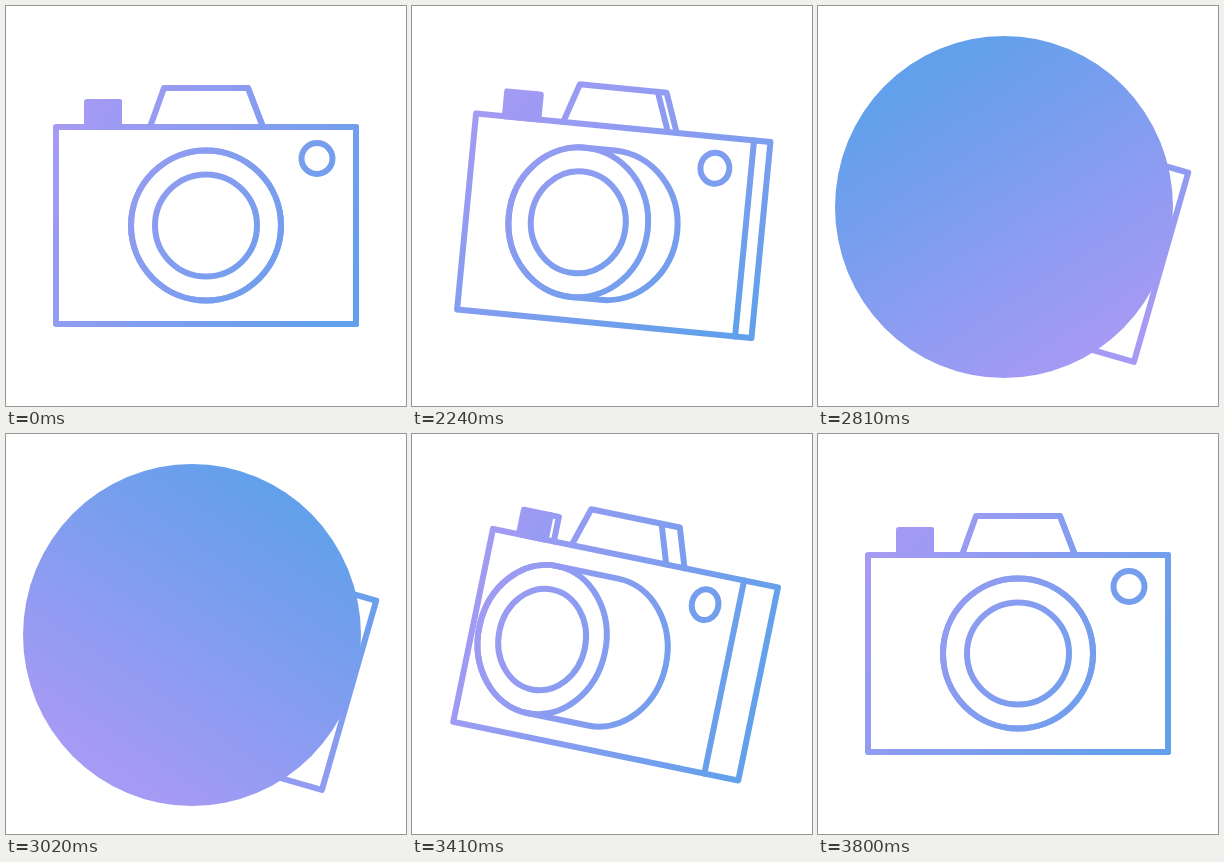
An HTML page with a canvas that plays this animation: 400 by 400 pixels, repeating every 3.83 s.

```html
<!DOCTYPE html>
<html>
<head>
<meta charset="utf-8">
<title>Camera</title>
<style>
html, body { margin: 0; width: 100%; height: 100%; overflow: hidden; background: #fff; }
canvas { display: block; width: 400px; height: 400px; }
</style>
</head>
<body>
<canvas width="400" height="400"></canvas>
<script>
const ctx = document.querySelector('canvas').getContext('2d');
const LOOP = 3830, START = 2000, STEP = 30;
const PURPLE = '#a59af4', BLUE = '#62a0eb';
const ROLL = 16 * Math.PI / 180;

const clamp = v => Math.max(0, Math.min(1, v));
const sine = u => 0.5 - 0.5 * Math.cos(Math.PI * clamp(u));
const smoother = u => u * u * u * (u * (6 * u - 15) + 10);

// Sets the shared colour sweep, centred on the stage
function paint(angle) {
  const x = 160 * Math.cos(angle), y = 160 * Math.sin(angle);
  const g = ctx.createLinearGradient(-x, -y, x, y);
  g.addColorStop(0, PURPLE);
  g.addColorStop(1, BLUE);
  ctx.fillStyle = ctx.strokeStyle = g;
}

function line(points, closed) {
  ctx.beginPath();
  points.forEach(p => ctx.lineTo(...p));
  if (closed) ctx.closePath();
  ctx.stroke();
}

function oval(x, y, rx, ry) {
  ctx.beginPath();
  ctx.ellipse(x, y, rx, ry, 0, 0, 2 * Math.PI);
}

// turn: 0 faces the viewer, 1 is fully turned to the side
function camera(turn) {
  const squash = 1 - 0.2 * turn;
  const at = (x, shift = 0) => x * squash + (shift - 13.2) * turn;

  // Body
  const top = -79, bottom = 118;
  const left = at(-150), edge = at(150), right = at(150, 47.6);
  line([[left, top], [right, top], [right, bottom], [left, bottom]], true);
  line([[edge, top], [edge, bottom]]);

  // Flash housing
  line([[at(-56), top], [at(-42), -118], [at(42, 25.7), -118], [at(57, 25.7), top]]);
  line([[at(42), -118], [at(57), top]]);

  // Shutter button
  const b0 = at(-119), b1 = at(-87), b2 = at(-87, 11.4);
  line([[b0, top], [b0, -104], [b1, -104], [b1, top]], true);
  ctx.fill();
  line([[b1, -104], [b2, -104], [b2, top]]);

  // Viewfinder
  oval(at(111), -47.5, 15.5 * squash, 15.5);
  ctx.stroke();

  // Lens barrel hides the body behind it
  const y = 19.5, r = 75, rx = r * squash;
  const base = at(0, 6.2), front = at(0, -79.4);
  ctx.beginPath();
  ctx.ellipse(base, y, rx, r, 0, -Math.PI / 2, Math.PI / 2);
  ctx.ellipse(front, y, rx, r, 0, Math.PI / 2, Math.PI * 1.5);
  ctx.closePath();
  ctx.save();
  ctx.fillStyle = '#fff';
  ctx.fill();
  ctx.restore();
  ctx.stroke();
  for (const size of [75, 51]) {
    oval(front, y, size * squash, size);
    ctx.stroke();
  }
}

function draw(time) {
  const t = Math.floor((time % LOOP - START) / STEP) * STEP;
  const turn = sine(t / 600) - sine((t - 1200) / 600);
  const roll = ROLL * turn;
  const sweep = (33 + 360 * smoother(clamp(t / 1800) ** 0.78)) * Math.PI / 180;

  ctx.setTransform(1, 0, 0, 1, 0, 0);
  ctx.fillStyle = '#fff';
  ctx.fillRect(0, 0, 400, 400);
  ctx.translate(200, 200);
  ctx.lineWidth = 6;
  ctx.lineJoin = ctx.lineCap = 'round';

  ctx.save();
  ctx.rotate(roll);
  paint(sweep - roll);
  camera(turn);
  ctx.restore();

  if (t >= 750 && t < 1050) {
    paint(sweep);
    oval(-14, 1, 169, 171);
    ctx.fill();
  }
}

const begin = performance.now();
function tick() {
  draw(performance.now() - begin);
  requestAnimationFrame(tick);
}
tick();
</script>
</body>
</html>
```
